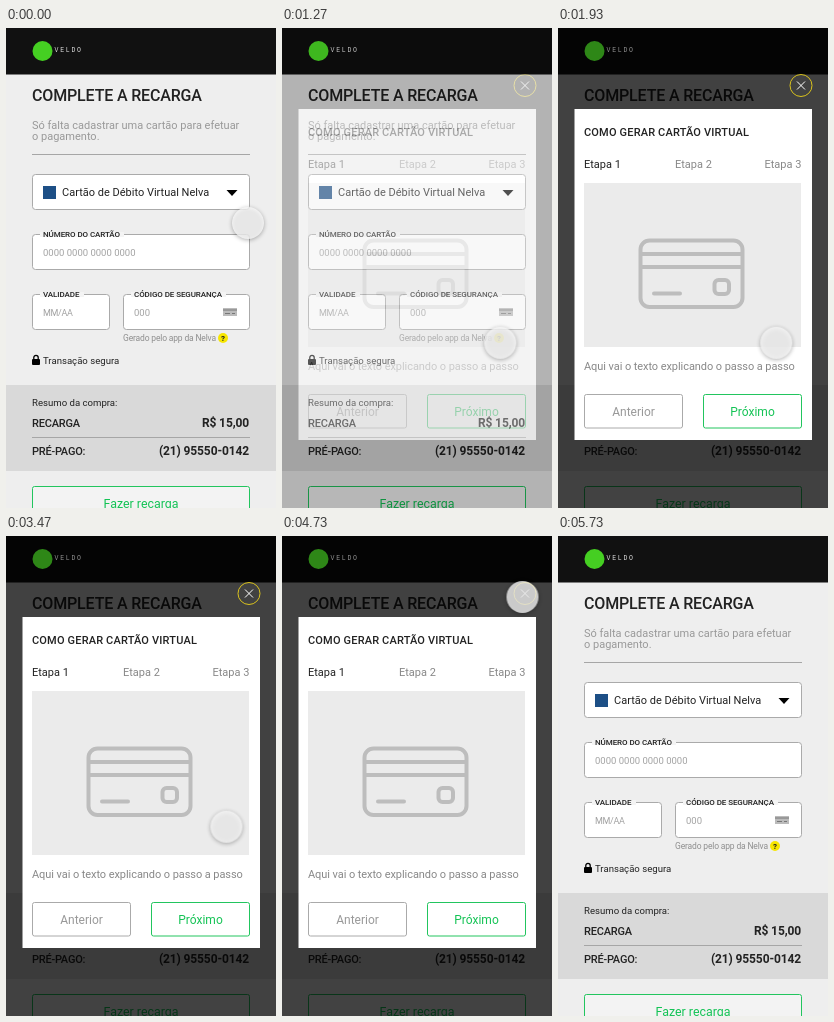
An HTML page that plays this animation: 270x480 px, repeating every 5990 ms.

```html
<!DOCTYPE html>
<html lang="pt-BR">
<head>
<meta charset="utf-8">
<title>Recarga</title>
<style>
html, body { margin: 0; width: 100%; height: 100%; overflow: hidden; background: #eee; }
svg { display: block; width: 100%; height: 100%; }
text { font-family: Roboto, "Open Sans", sans-serif; font-size: 11px; fill: #222; }
.title { font-size: 16px; font-weight: 500; letter-spacing: -.16px; }
.lead { fill: #999; }
.label { font-size: 8px; font-weight: 500; letter-spacing: -.08px; }
.hint { font-size: 9.5px; fill: #a2a2a2; }
.note { font-size: 8.5px; letter-spacing: -.16px; fill: #8f8f8f; }
.small { font-size: 9.6px; }
.row { font-weight: 500; letter-spacing: -.19px; }
.value { font-size: 12px; font-weight: 700; letter-spacing: -.12px; text-anchor: end; }
.button { font-size: 12px; text-anchor: middle; }
.go { fill: #14c355; }
.muted { fill: #888; }
.box { fill: #fff; stroke: #aaa; }
.rule { stroke: #a6a6a6; }
.outline { fill: none; stroke: #22c55e; }
.brand { font: 6.5px "Liberation Mono", "DejaVu Sans Mono", monospace; letter-spacing: 1.75px; fill: #ddd; }
#cursor { filter: drop-shadow(0 1px 2px rgba(0, 0, 0, .4)); }
</style>
</head>
<body>
<svg viewBox="0 0 270 480">
  <g id="page">
    <rect width="270" height="480" fill="#eee"/>
    <rect width="270" height="46.5" fill="#111"/>
    <text class="title" x="26" y="73">COMPLETE A RECARGA</text>
    <text class="lead" x="26" y="101">Só falta cadastrar uma cartão para efetuar</text>
    <text class="lead" x="26" y="112">o pagamento.</text>
    <path class="rule" d="M26 126.5H244"/>

    <rect class="box" x="26.5" y="146.5" width="217" height="35" rx="3"/>
    <rect x="37" y="158" width="13" height="13" fill="#1d4f86"/>
    <text x="56" y="168">Cartão de Débito Virtual Nelva</text>
    <path d="M220.5 162H231.5L226 168Z"/>

    <rect class="box" x="26.5" y="206.5" width="217" height="35" rx="3"/>
    <rect x="34" y="204" width="84" height="5" fill="#f4f4f4"/>
    <text class="label" x="37" y="209.2">NÚMERO DO CARTÃO</text>
    <text class="hint" x="37" y="228">0000 0000 0000 0000</text>

    <rect class="box" x="26.5" y="266.5" width="77" height="35" rx="3"/>
    <rect x="34" y="264" width="44" height="5" fill="#f4f4f4"/>
    <text class="label" x="37" y="269.2">VALIDADE</text>
    <text class="hint" x="37" y="287.5" style="font-size:9px;letter-spacing:-.35px">MM/AA</text>

    <rect class="box" x="117.5" y="266.5" width="126" height="35" rx="3"/>
    <rect x="125" y="264" width="95" height="5" fill="#f4f4f4"/>
    <text class="label" x="128" y="269.2">CÓDIGO DE SEGURANÇA</text>
    <text class="hint" x="128" y="287.5">000</text>
    <rect x="217" y="280" width="14" height="8" fill="#bbb"/>
    <path d="M217 282H231M219 285.5H224M226 285.5H229" stroke="#777"/>

    <text class="note" x="117" y="313">Gerado pelo app da Nelva</text>
    <circle cx="217" cy="310" r="5" fill="#f7e600"/>
    <text x="217" y="312.8" text-anchor="middle" style="font-size:8px;font-weight:700">?</text>

    <rect x="26" y="331" width="8" height="6" rx="1"/>
    <path d="M27.8 331V329.5a2.2 2.2 0 0 1 4.4 0V331" fill="none" stroke="#000" stroke-width="1.3"/>
    <text class="small" x="37" y="335.5">Transação segura</text>

    <rect y="357" width="270" height="86" fill="#d9d9d9"/>
    <text class="small" x="26" y="378">Resumo da compra:</text>
    <text class="row" x="26" y="399">RECARGA</text>
    <text class="value" x="243" y="399">R$ 15,00</text>
    <path class="rule" d="M26 409.5H244"/>
    <text class="row" x="26" y="427">PRÉ-PAGO:</text>
    <text class="value" x="243" y="427">(21) 95550-0142</text>

    <rect class="outline" x="26.5" y="458.5" width="217" height="36" rx="2" style="fill:#f3f3f3"/>
    <text class="button go" x="135" y="480" style="font-size:12.4px">Fazer recarga</text>
  </g>

  <g id="overlay" opacity="0">
    <rect width="270" height="480" fill-opacity=".73"/>
    <circle cx="243" cy="57.5" r="11" fill="none" stroke="#d9c21c"/>
    <path d="M239 53.5L247 61.5M247 53.5L239 61.5" stroke="#fff"/>
    <rect x="16.5" y="81" width="237.5" height="331" fill="#fff"/>
    <text x="26" y="108" style="font-weight:500;letter-spacing:.17px">COMO GERAR CARTÃO VIRTUAL</text>
    <text x="26" y="139.5">Etapa 1</text>
    <text class="muted" x="117" y="139.5">Etapa 2</text>
    <text class="muted" x="206.5" y="139.5">Etapa 3</text>
    <rect x="26" y="155" width="217" height="164" fill="#ebebeb"/>
    <g fill="none" stroke="#bdbdbd" stroke-width="4">
      <rect x="82.5" y="212.5" width="102" height="66.5" rx="9"/>
      <path d="M83 226H184M83 239H184"/>
      <path d="M96 265.5H122" stroke-linecap="round"/>
      <rect x="156.5" y="252" width="14.5" height="14" rx="4"/>
    </g>
    <text class="muted" x="26" y="342" style="letter-spacing:-.07px">Aqui vai o texto explicando o passo a passo</text>
    <rect class="outline" x="26.5" y="366.5" width="98" height="33.5" rx="2" style="stroke:#aaa"/>
    <text class="button" x="75.5" y="388" style="fill:#999">Anterior</text>
    <rect class="outline" x="145.5" y="366.5" width="98" height="33.5" rx="2"/>
    <text class="button go" x="194.5" y="388">Próximo</text>
  </g>

  <g id="logo">
    <circle cx="36.5" cy="23" r="10" fill="#45cf22"/>
    <text class="brand" x="48.5" y="23.5">VELDO</text>
  </g>

  <g id="cursor"><circle r="16" fill="#fafafa" fill-opacity=".77"/></g>
</svg>
<script>
const LOOP = 5990, STEP = 200 / 3;

// Each row: time in ms, value. Every leg eases in and out.
function track(id, rows, toStyle) {
  const last = rows[rows.length - 1];
  const frames = [...rows, [LOOP, ...last.slice(1)]].map(([ms, ...v]) => ({
    offset: ms / LOOP, easing: 'ease-in-out', ...toStyle(...v)
  }));
  const anim = document.getElementById(id).animate(frames, { duration: LOOP, fill: 'both' });
  anim.pause();
  return anim;
}

const opacity = o => ({ opacity: o });
const place = (x, y) => ({ transform: `translate(${x}px, ${y}px)` });
const fade = (from, to) => [[0, from], [1040, from], [1600, to], [5030, to], [5600, from]];

const tracks = [
  track('overlay', fade(0, 1), opacity),
  track('logo', fade(1, .65), opacity),
  track('cursor', [
    [0, 242, 195], [670, 218.3, 314.8],
    [3200, 218.3, 314.8], [4440, 240.5, 61],
    [5250, 240.5, 61], [5800, 212, -24]
  ], place)
];

const start = performance.now();
function tick() {
  const ms = (performance.now() - start) % LOOP;
  const held = Math.floor((ms + 4) / STEP) * STEP; // 15 pictures a second
  for (const t of tracks) t.currentTime = Math.min(held, LOOP - 1);
  requestAnimationFrame(tick);
}
tick();
</script>
</body>
</html>
```
